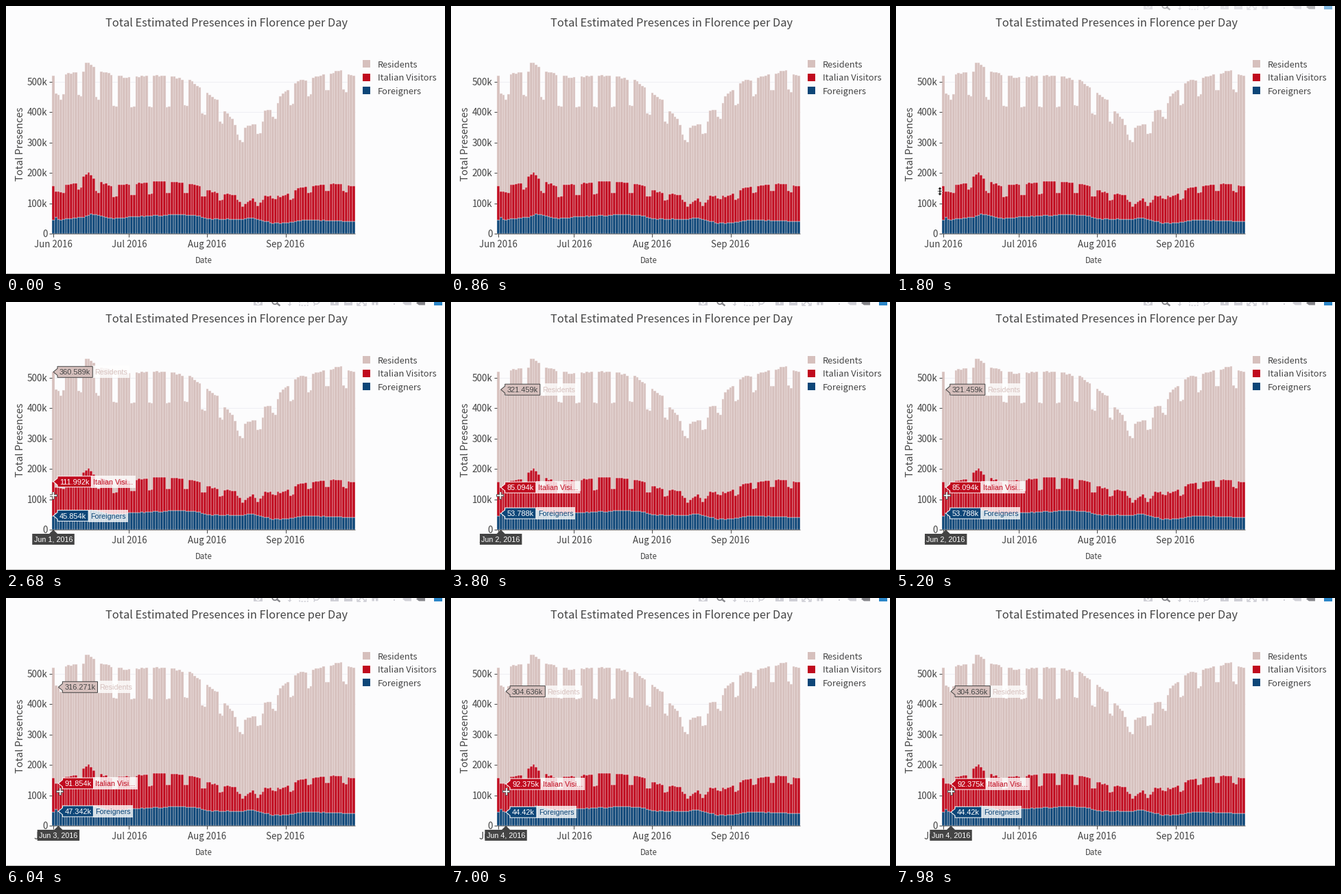
These frames come from a looping animation (640x392 px, 8 s). A matplotlib script:

```python
import numpy as np
import matplotlib.pyplot as plt
from matplotlib.animation import FuncAnimation
from matplotlib.collections import PolyCollection
from matplotlib.patches import Circle, Polygon
from matplotlib.transforms import Affine2D

W, H, DPI = 640, 392, 100
LOOP, STEP = 8000, 40
PT = 72 / DPI

BG, INK, GRID = "#fcfcfd", "#444444", "#eeeef3"
ROSE, RED, BLUE = "#d6c0bd", "#c00a1e", "#0d4678"
EDGE, PALE, ACTIVE = "#f6eeee", "#cfcfd6", "#85858a"

X0, DAY = 69.0, 3.68          # centre of first bar, bar pitch
Y0, PER_K = 333.0, 0.445      # baseline, pixels per thousand
DAYS = np.arange(120)

plt.rcParams["font.family"] = ["Noto Sans CJK JP", "Liberation Sans"]
fig = plt.figure(figsize=(W / DPI, H / DPI), dpi=DPI, facecolor=BG)
ax = fig.add_axes([0, 0, 1, 1])
ax.set_xlim(0, W)
ax.set_ylim(H, 0)
ax.axis("off")


def poly(pts, color, z=1, **kw):
    kw = {"lw": 0, **kw}
    return ax.add_patch(Polygon(pts, closed=True, fc=color, zorder=z, **kw))


def rect(x1, y1, x2, y2, color, z=1, **kw):
    return poly([(x1, y1), (x2, y1), (x2, y2), (x1, y2)], color, z, **kw)


def line(pts, color, width=1, z=2, **kw):
    xs, ys = zip(*pts)
    return ax.plot(xs, ys, color=color, lw=width * PT, zorder=z,
                   solid_capstyle="butt", **kw)[0]


def text(x, y, s, size, color=INK, ha="left", z=3, **kw):
    return ax.text(x, y, s, fontsize=size * PT, color=color, ha=ha,
                   va="baseline", zorder=z, **kw)


def curve(*points):
    return np.interp(DAYS, *zip(*points))


# ---- daily data, in thousands ----
# smooth weekday levels, less a dip on Saturdays and Sundays
rng = np.random.default_rng(4)
weekend = np.isin(DAYS % 7, (3, 4))
dip = weekend * curve((3, 65), (24, 102), (45, 100), (66, 62), (74, 0),
                      (82, 0), (88, 28), (94, 60), (108, 50), (119, 65))
total = curve((0, 520), (12, 533), (13, 560), (15, 556), (17, 536),
              (28, 514), (44, 520), (55, 502), (59, 470), (66, 434),
              (68, 400), (71, 380), (74, 310), (75, 301), (76, 350),
              (80, 362), (81, 327), (82, 330), (84, 406), (88, 408),
              (90, 455), (97, 500), (114, 536), (119, 517)) - dip
visitors = curve((0, 152), (9, 168), (14, 202), (17, 174), (23, 158),
                 (44, 174), (56, 163), (63, 138), (72, 128), (75, 92),
                 (79, 116), (81, 92), (84, 124), (91, 124), (98, 153),
                 (114, 166), (119, 155)) - 0.38 * dip
foreign = curve((0, 46), (12, 54), (15, 66), (24, 49), (30, 55), (50, 63),
                (58, 58), (61, 49), (75, 47), (78, 53), (87, 35), (93, 36),
                (100, 46), (119, 40))
for series, spread in ((total, 3), (visitors, 2), (foreign, 1)):
    series += rng.uniform(-spread, spread, len(DAYS))

# values read out under the pointer: foreigners, Italian visitors, residents
READINGS = np.array([
    (45.854, 111.992, 360.589),
    (53.788, 85.094, 321.459),
    (47.342, 91.854, 316.271),
    (44.42, 92.375, 304.636),
])
n = len(READINGS)
foreign[:n], visitors[:n], total[:n] = READINGS.cumsum(axis=1).T


def day_x(d):
    return X0 + DAY * d


def val_y(k):
    return Y0 - PER_K * k


# ---- chart ----
for k in range(100, 501, 100):
    line([(67, val_y(k)), (508.5, val_y(k))], GRID, 1, 0.5)

for low, high, color in ((0 * total, foreign, BLUE),
                         (foreign, visitors, RED),
                         (visitors, total, ROSE)):
    bars = [[(day_x(d + side), val_y(k))
             for side, k in ((-0.5, a), (-0.5, b), (0.5, b), (0.5, a))]
            for d, a, b in zip(DAYS, low, high)]
    ax.add_collection(PolyCollection(bars, facecolors=color, edgecolors=EDGE,
                                     linewidths=0.45 * PT, zorder=1),
                      autolim=False)

line([(67, Y0), (508.5, Y0)], INK, 0.8)
for k in range(0, 501, 100):
    line([(62.5, val_y(k)), (66.5, val_y(k))], INK)
    text(60.5, val_y(k) + 5, f"{k}k" if k else "0", 13.5, ha="right")
for d, month in ((0, "Jun"), (30, "Jul"), (61, "Aug"), (92, "Sep")):
    line([(day_x(d), Y0), (day_x(d), Y0 + 5)], INK)
    text(day_x(d), 353, f"{month} 2016", 13.3, ha="center")

text(321.5, 29.5, "Total Estimated Presences in Florence per Day", 16.4,
     ha="center")
text(288, 375.5, "Date", 11.5, ha="center")
text(25, 202, "Total Presences", 14.6, ha="center", rotation=90,
     rotation_mode="anchor")
for i, (name, color) in enumerate((("Residents", ROSE),
                                   ("Italian Visitors", RED),
                                   ("Foreigners", BLUE))):
    y = 84.5 + 19.5 * i
    rect(520, y - 5.5, 531, y + 5.5, color)
    text(542, y + 5, name, 12.95)
line([(0, 390.5), (W, 390.5)], "#b4b4b4")


# ---- toolbar, cut by the top edge ----
def tag(x, color):
    return poly([(x, 1.5), (x + 4, -2), (x + 13, -2), (x + 13, 4.5),
                 (x + 4, 4.5)], color)


def ring(x, y, r, color):
    return ax.add_patch(Circle((x, y), r, fc="none", ec=color, lw=1.8 * PT))


toolbar = [
    rect(361, -3, 374, 5, PALE), ring(367.5, 0.5, 2.6, BG),
    ring(392, -0.5, 3.8, ACTIVE),
    line([(394.5, 1.5), (399.5, 5.5)], ACTIVE, 2.4),
    line([(413.5, -2), (413.5, 4)], PALE, 1.6),
    poly([(410.5, 3), (416.5, 3), (413.5, 6)], PALE),
    line([(428, -2), (428, 4.5), (440, 4.5), (440, -2)], PALE, 1.5,
         linestyle=(0, (1.6, 1.2))),
    line([(448, -1), (450, 3), (454, 3), (458, -1)], PALE, 1.6),
    line([(450, 3), (449, 5.5)], PALE, 1.6),
    rect(473, -6, 485, 5, PALE), line([(479, -4), (479, 2.5)], BG, 1.6),
    rect(493, -6, 505, 5, PALE), line([(496, 0), (502, 0)], BG, 1.6),
    poly([(532, 0), (538, -6), (544, 0), (542.5, 0), (542.5, 4.5),
          (533.5, 4.5), (533.5, 0)], PALE),
    rect(536.8, 1, 539.2, 4.5, BG),
    rect(565, 1.5, 567, 3.5, PALE),
    tag(578, PALE), tag(598, ACTIVE),
    rect(624, -6, 636, 5, "#2b86c8"),
]
for s in (-1, 1):
    toolbar += [
        line([(518.5, -1), (518.5 + 5.5 * s, 4.5)], PALE, 1.8),
        line([(518.5 + 2 * s, 4.7), (518.5 + 6.5 * s, 4.7),
              (518.5 + 6.5 * s, 1)], PALE, 1.6)]


# ---- hover labels, one group per day ----
def hover_text(x, y, s, size, color, ha="left"):
    t = text(x, y, s, size, color, ha, z=8, family="Liberation Sans")
    return t, t.get_window_extent().width


def value_label(x, k, value, name, fill, ink):
    y = val_y(k)
    t, width = hover_text(x + 9, y + 4, f"{value:g}k", 11, ink)
    right = x + 12 + width
    box = poly([(x, y), (x + 6, y - 5), (x + 6, y - 8), (right, y - 8),
                (right, y + 8), (x + 6, y + 8), (x + 6, y + 5)],
               fill, 7, ec=ink, lw=PT)
    label, width = hover_text(right + 3, y + 4, name, 10.6, fill)
    back = rect(right, y - 9, right + 6 + width, y + 9, "white", 6, alpha=0.8)
    return [t, box, label, back]


def date_label(x, s):
    t, width = hover_text(x, 351, s, 10.8, "white", "center")
    half = width / 2 + 2.5
    return [t, poly([(x, Y0), (x + 6, 339), (x + half, 339), (x + half, 355),
                     (x - half, 355), (x - half, 339), (x - 6, 339)], INK, 7)]


def hover(d):
    x = day_x(d)
    f, v, r = READINGS[d]
    return (value_label(x, total[d], r, "Residents", ROSE, INK)
            + value_label(x, visitors[d], v, "Italian Visi...", RED, "white")
            + value_label(x, foreign[d], f, "Foreigners", BLUE, "white")
            + date_label(x, f"Jun {d + 1}, 2016"))


hovers = [hover(d) for d in range(n)]

# ---- mouse pointers, drawn around (0, 0) ----
shift = Affine2D()
place = shift + ax.transData
cross = [line(p, c, w, 10, transform=place)
         for c, w, r in (("#555555", 3.6, 5.5), ("white", 1.6, 4.7))
         for p in ([(-r, 0), (r, 0)], [(0, -r), (0, r)])]
side = [(0, -6.5), (3.5, -3), (1, -3), (1, -0.8), (3.5, -0.8)]
side += [(x, -y) for x, y in side[::-1]]
resize = [poly(side + [(-x, y) for x, y in side[::-1]], "#111111", 10,
               ec="white", lw=0.7 * PT, transform=place)]
arrow = [poly([(0, 0), (0, 12), (2.8, 9.5), (4.8, 14), (6.8, 13.2),
               (4.9, 8.8), (8.5, 8.6)], "#111111", 10, ec="white",
              lw=0.8 * PT, transform=place)]

# pointer moves: start in seconds, dx, dy
MOVES = ((1.2, 74, 9), (1.95, 5, 12), (3.3, 2.5, 0), (4.6, 2.8, 0),
         (5.5, 4.2, 0), (6.5, 2, 0))
MOVE_TIME = 0.5


def ease(u):
    u = min(max(u, 0), 1)
    return u * u * (3 - 2 * u)


def pointer(t):
    x, y = -10, 262
    for start, dx, dy in MOVES:
        u = ease((t - start) / MOVE_TIME)
        x, y = x + dx * u, y + dy * u
    return x, y


def show(group, on):
    for a in group:
        a.set_visible(on)


def update(i):
    t = i * STEP / 1000
    x, y = pointer(t)
    shift.clear().translate(x, y)

    inside = x >= 67
    show(cross, inside)
    show(resize, 45 <= x < 67)
    show(arrow, x < 45)
    day = round((x - 0.5 - X0) / DAY)
    for d, group in enumerate(hovers):
        show(group, inside and d == day)

    for a in toolbar:
        a.set_alpha(ease((t - 1.6) / 0.36))
    return []


anim = FuncAnimation(fig, update, frames=LOOP // STEP, interval=STEP,
                     repeat=True, repeat_delay=0, blit=False)
plt.show()
```
